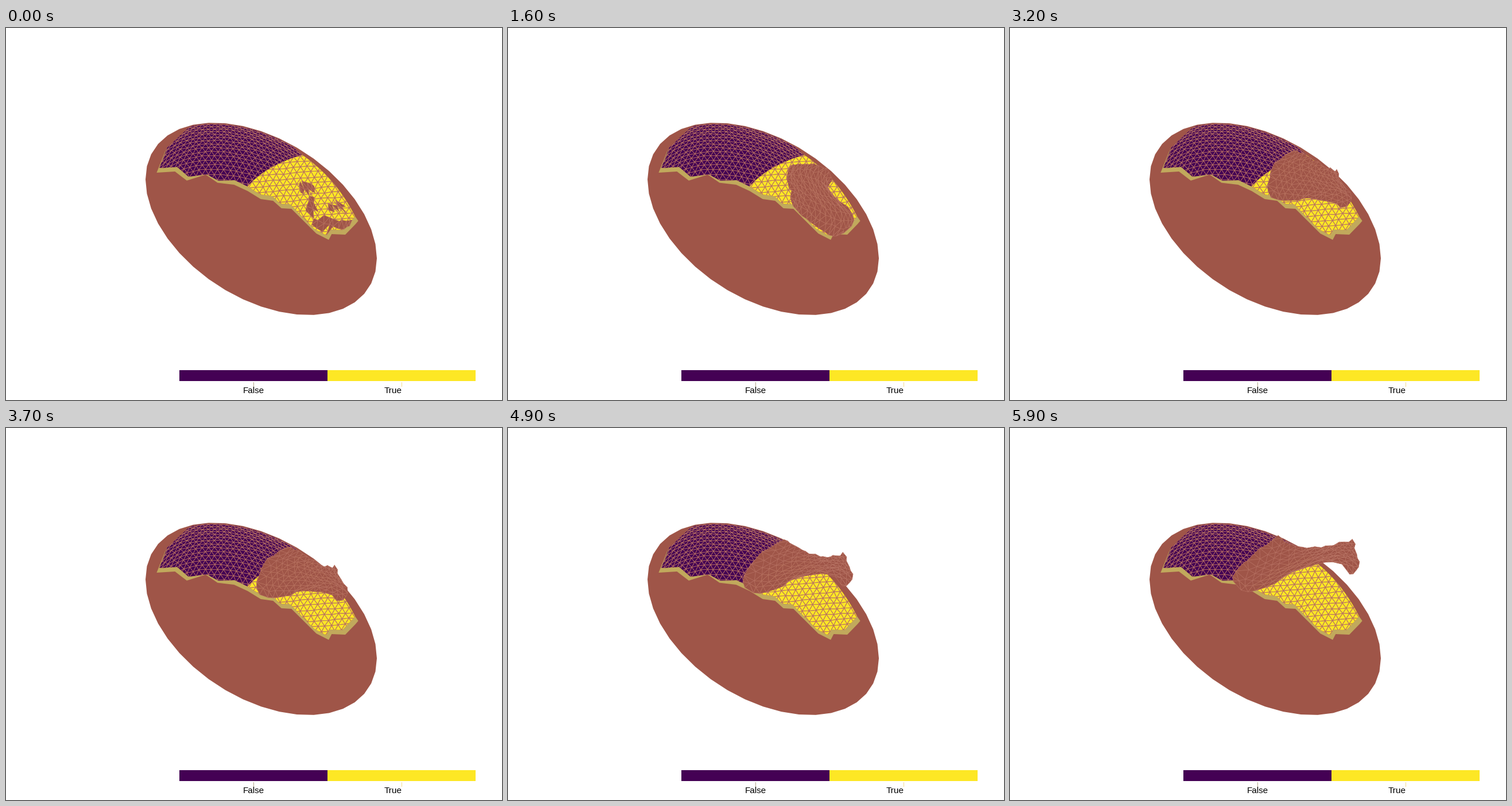
These frames come from a looping animation (864 by 648 pixels, 6000 ms). A matplotlib script:

```python
import numpy as np
import matplotlib.pyplot as plt
from matplotlib.animation import FuncAnimation
from matplotlib.collections import PolyCollection
from matplotlib.patches import Polygon, Rectangle

W, H, FRAMES, STEP = 864, 648, 60, 100
BROWN, KHAKI, EDGE = "#9f5548", "#c1a95c", "#b87262"
PURPLE, YELLOW = "#440154", "#fde725"
CX, CY, RX, RY, TILT = 444.5, 332.5, 201.5, 167.5, np.arccos(0.41)
START, END = 1.6, 5.9
rng = np.random.default_rng(4)


def pts(text):
    return np.array([p.split(",") for p in text.split()], float)


def body(angle):
    return np.column_stack([CX + RX * np.cos(angle),
                            CY + RY * np.cos(angle - TILT)])


def ridge(x):
    """Height of the body's upper outline at x."""
    angle = -np.arccos(np.clip((x - CX) / RX, -1, 1))
    return CY + RY * np.cos(angle - TILT)


def bezier(a, b, c, n=16):
    s = np.linspace(0, 1, n)[:, None]
    return (1 - s) ** 2 * a + 2 * s * (1 - s) * b + s ** 2 * c


def lagrange(knots, x):
    """Weights that interpolate values at the knots, one row per x."""
    x = np.atleast_1d(x)
    return np.column_stack([
        np.prod([(x - q) / (k - q) for q in knots if q != k], axis=0)
        for k in knots])


def grid(rows, cols):
    """Column and row of each node, odd rows shifted, and the triangles."""
    i, j = np.mgrid[:rows, :cols].astype(float)
    tris = []
    for r in range(rows - 1):
        for a in range(r * cols, r * cols + cols - 1):
            b, c, d = a + 1, a + cols, a + cols + 1
            tris += [(a, c, d), (a, b, d)] if r % 2 else [(a, b, c), (b, d, c)]
    return (j + 0.5 * (i % 2)).ravel(), i.ravel(), np.array(tris)


# Torn front edge, left to right; the two colours meet at SPLIT.
FRONT = pts("281,208 267,244 298,242 318,259 350,255 370,266 398,265 421,276 "
            "443,290 464,293 478,306 495,307 537,350 558,361 563,351 586,352 "
            "603,334 608,328")
SPLIT = 7
seam = bezier(FRONT[SPLIT], pts("452,240"), pts("516,221"))
back = bezier(seam[-1], pts("575,262"), FRONT[-1])
top_x = np.linspace(500, 320, 20)
top = np.column_stack([top_x, ridge(top_x) + 2])
dark = np.vstack([FRONT[:SPLIT + 1], seam, top])
light = np.vstack([FRONT[SPLIT:], back[::-1], seam[::-1]])

# The rim hangs below the front edge and sinks into the body near x = 352.
drop = np.clip(np.abs(FRONT[:, 0] - 352) / 40, 0, 1)
lower = FRONT + np.column_stack([0.03 * (FRONT[:, 0] - 420), 8 * drop])
rim = np.vstack([FRONT, lower[::-1]])

# Loop of the sheet at start, middle and end, four points to a side:
# down the left, along the bottom, up the right, back along the top.
LOOPS = np.array([
    pts("490,240 487,262 492,285 495,308 520,333 556,358 "
        "586,352 599,322 566,290 566,266 545,240 515,237"),
    pts("489,207 457,228 440,256 440,288 487,292 535,283 "
        "579,303 594,285 584,262 573,240 550,238 520,222"),
    pts("465,187 437,210 404,238 387,265 447,276 528,237 "
        "593,257 606,240 604,218 597,195 555,204 503,207")])
# Places where the sheet first breaks through: x, y, rx, ry.
SPOTS = [(526, 279, 14, 8), (532, 311, 9, 14),
         (578, 310, 18, 6), (567, 341, 33, 10)]

ROWS, COLS = 10, 15
col, row, SHEET = grid(ROWS, COLS)
U = np.where(col == 0.5, 0, np.clip(col / (COLS - 1), 0, 1))[:, None]
V = row[:, None] / (ROWS - 1)
THIRDS = np.linspace(0, 1, 4)
ALONG, DOWN = lagrange(THIRDS, U[:, 0]), lagrange(THIRDS, V[:, 0])
WOBBLE = rng.uniform(-2.4, 2.4, (ROWS * COLS, 2))


def sheet_points(t):
    """Fill the moving loop with a Coons patch."""
    p = max(0, (t - START) / (END - START))
    loop = np.tensordot(lagrange((0, 0.49, 1), p)[0], LOOPS, axes=1)
    left, bottom = loop[:4], loop[3:7]
    right, upper = loop[9:5:-1], loop[[0, 11, 10, 9]]
    corners = ((1 - V) * ((1 - U) * upper[0] + U * upper[3])
               + V * ((1 - U) * bottom[0] + U * bottom[3]))
    return ((1 - V) * (ALONG @ upper) + V * (ALONG @ bottom)
            + (1 - U) * (DOWN @ left) + U * (DOWN @ right)
            - corners + WOBBLE)


def reveal_times():
    mid = sheet_points(0)[SHEET].mean(axis=1)
    dist = np.min([np.hypot((mid[:, 0] - x) / rx, (mid[:, 1] - y) / ry)
                   for x, y, rx, ry in SPOTS], axis=0)
    return np.clip((dist - 1.05) * 0.4, 0, 0.9)


REVEAL = reveal_times()

fig = plt.figure(figsize=(W / 72, H / 72), dpi=72, facecolor="white")
ax = fig.add_axes([0, 0, 1, 1])
ax.set(xlim=(0, W), ylim=(H, 0))
ax.axis("off")


def shape(points, color, z):
    return ax.add_patch(Polygon(points, fc=color, ec="none", zorder=z))


def surface(points, color, x, y, tris, lw):
    patch = shape(points, color, 3)
    nodes = np.column_stack([x, y]) + rng.uniform(-0.9, 0.9, (len(x), 2))
    mesh = PolyCollection(nodes[tris], facecolors="none", edgecolors=EDGE,
                          linewidths=lw, zorder=4)
    ax.add_collection(mesh, autolim=False)
    mesh.set_clip_path(patch)


shape(body(np.linspace(0, 2 * np.pi, 41)), BROWN, 1)
shape(rim, KHAKI, 2)

# Rows crowd together towards the ridge.
col, row, tris = grid(22, 30)
x = 250 + 10.8 * col
surface(dark, PURPLE, x, ridge(x) + 3 * row + 0.2 * row ** 2, tris, 0.65)

col, row, tris = grid(20, 20)
x = 405 + 12 * col
surface(light, YELLOW, x, 205 + 9.6 * row - 0.08 * (x - 500), tris, 0.9)

for x, color, tick, tint, tx, word in (
        (302, PURPLE, 430.5, "#b5a78c", 431, "False"),
        (559.7, YELLOW, 688.5, "#f3dc8c", 674.5, "True")):
    ax.add_patch(Rectangle((x, 595.5), 257.8, 19.5, fc=color, ec="none"))
    ax.plot([tick, tick], [616.5, 623.5], color=tint, lw=1)
    ax.text(tx, 636, word, ha="center", va="baseline", color="black",
            fontsize=15.2, family="Liberation Sans")

sheet = PolyCollection([], facecolors=BROWN, edgecolors=EDGE,
                       linewidths=0.65, zorder=7)
ax.add_collection(sheet, autolim=False)


def draw(frame):
    t = frame * STEP / 1000
    sheet.set_verts(sheet_points(t)[SHEET[REVEAL <= t]])
    return sheet,


anim = FuncAnimation(fig, draw, frames=FRAMES, interval=STEP,
                     repeat=True, repeat_delay=0)
plt.show()
```
